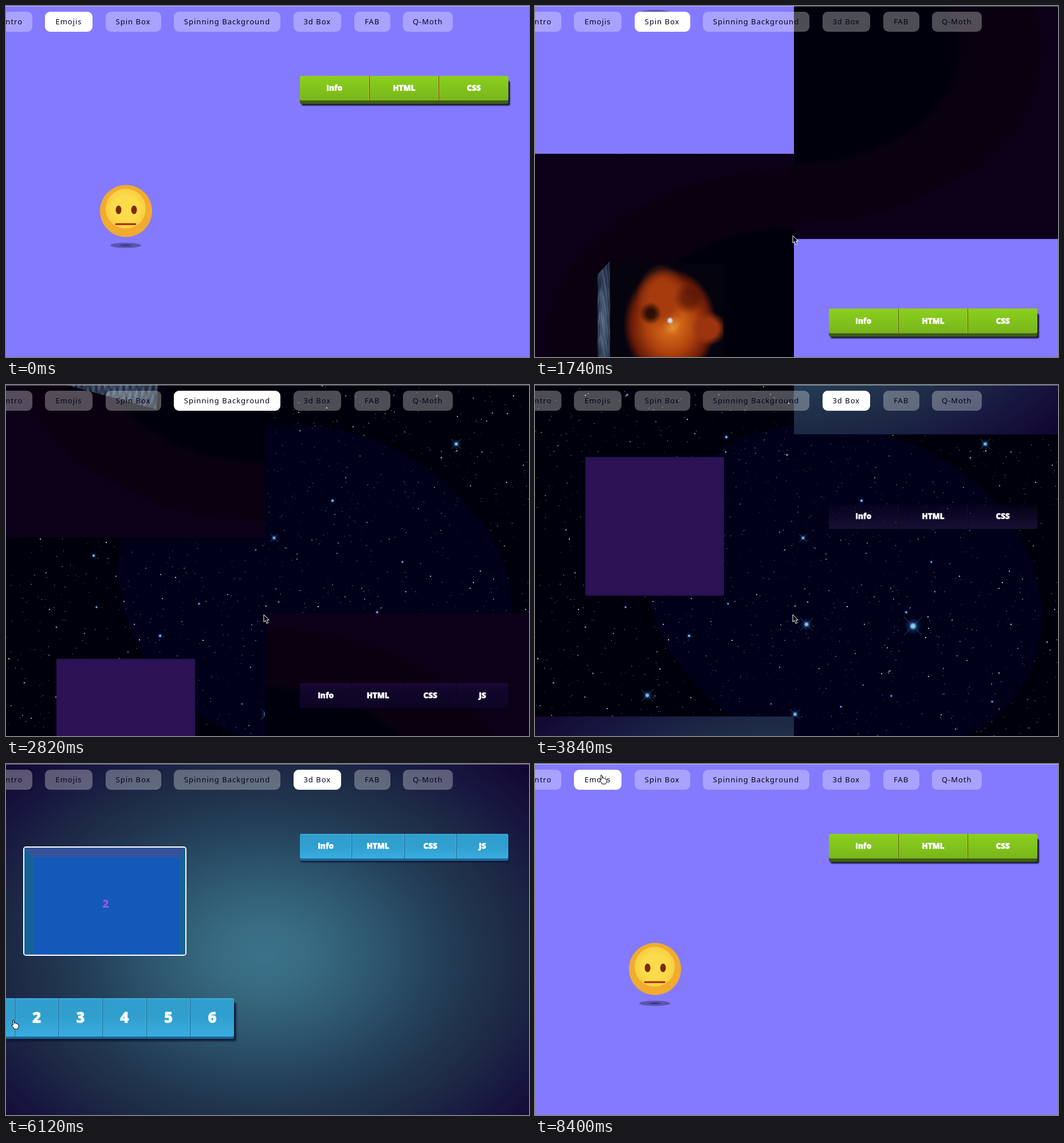
These frames come from a looping animation (913x613 px, 8460 ms). An HTML page with a canvas:

```html
<!DOCTYPE html>
<html lang="en">
<head>
<meta charset="utf-8">
<title>Split scroll showcase</title>
<style>
html, body { margin: 0; width: 100%; height: 100%; overflow: hidden; background: #00000c; }
#stage { position: absolute; left: 0; top: 0; width: 913px; height: 613px; overflow: hidden; }
#stage * { box-sizing: border-box; }
#stars, .half, .panel, .tab, .bar, .view, .room, .wall, .cube, .face, svg, #topline { position: absolute; }
.half { top: 0; height: 613px; overflow: hidden; }
#left { left: 0; width: 452px; }
#right { left: 452px; width: 461px; }
.panel { left: 0; top: 0; width: 913px; height: 665px; }
#right .panel { left: -452px; }
.p0 { background: #847aff; }
.p1 { background: radial-gradient(ellipse 640px 450px at 452px 332px, #00000c 0 44%, #090010 46%, #0a0010 66%, #0c0018 69% 100%); }
.p3 { background: radial-gradient(ellipse 640px 470px at 451px 332px,
  #3b728a 0, #386c82 12%, #2d556d 32%, #25425b 46%, #21354f 57%, #1d2845 70%, #171640 84%, #120630 100%); }
#topline { left: 0; top: 0; width: 913px; height: 1px; background: rgba(255,255,255,.42); }
.tab { top: 10px; height: 35px; border-radius: 9px; background: rgba(255,255,255,.3); color: #05021a;
  font: 13px/34px "Noto Sans", sans-serif; letter-spacing: 1px; text-align: center; white-space: nowrap; }
.tab.on { background: #fff; }
.bar { display: flex; left: 513px; top: 122px; width: 364px; height: 43px; border-radius: 3px; color: #fff;
  font: 800 13.5px/43px "Open Sans", Lato, sans-serif; text-align: center; -webkit-text-stroke: .5px #fff; }
.bar span { flex: 1; }
.bar span + span { border-left: 1px solid var(--line); box-shadow: -1px 0 var(--glint); }
.p0 .bar { background: linear-gradient(#8bd01e, #79b51b); --line: #42650d; --glint: #d9b03c;
  box-shadow: 0 6px #3c5f12, 3px 9px 2px rgba(10,10,25,.85); }
.p1 .bar { background: linear-gradient(#210638 0, #12062c 20%, #0d0525); --line: #06021a; --glint: #180a31; }
.p2 .bar { background: linear-gradient(rgba(22,5,48,.2), rgba(28,18,56,.85)); --line: #050416; --glint: #1d1236; }
.p3 .bar { background: linear-gradient(#45b3e3 0, #309fce 4%, #309fce 48%, #39acdf); --line: #1d6793; --glint: #4db5e0;
  box-shadow: 0 4px #1b6695, 1px 7px 2px rgba(15,20,50,.7); }
.p3 .bar.digits { left: -61px; top: 409px; width: 459px; height: 67px; font-size: 26px; line-height: 67px;
  box-shadow: 0 4px #1b6695, 4px 8px 3px rgba(12,16,45,.8); }
.badge { position: absolute; left: 88px; top: 212px; width: 242px; height: 242px; background: #2a1255; }
.view { left: 30px; top: 144px; width: 285px; height: 191px; border: 2px solid #fff; border-radius: 5px; overflow: hidden;
  background: #166296; perspective: 900px; perspective-origin: 180px 180px; }
.room { left: 16px; top: 16px; width: 256px; height: 171px; transform-style: preserve-3d; }
.wall { left: 0; top: 0; width: 256px; height: 171px; padding: 0 4px 8px 0; backface-visibility: hidden;
  display: flex; align-items: center; justify-content: center; border: 1px solid rgba(60,90,200,.5);
  color: #9657e6; font: 800 19px "Open Sans", Lato, sans-serif; }
.wall.flat { top: -42.5px; height: 256px; }
.wall:first-child { color: #fff; }
.scene { position: absolute; left: 119px; top: 203px; width: 180px; height: 180px; perspective: 700px; }
.cube { width: 180px; height: 180px; transform-style: preserve-3d; }
.face { width: 180px; height: 180px; backface-visibility: hidden; }
.nebula { background:
  radial-gradient(circle at 51% 49%, #c7d8ff 0 2%, transparent 4%),
  radial-gradient(circle at 34% 43%, rgba(15,3,6,.8) 0 4%, transparent 11%),
  radial-gradient(circle at 68% 30%, rgba(70,14,4,.6) 0 6%, transparent 14%),
  radial-gradient(ellipse 22% 20% at 86% 56%, #9c350f 0 40%, transparent 75%),
  radial-gradient(ellipse 25% 32% at 44% 30%, #a63b0d 0 45%, transparent 90%),
  radial-gradient(ellipse 42% 48% at 52% 52%, #f0a63a 0, #d06519 20%, #ae410d 52%, #6a1b08 82%, transparent 98%), #05040e; }
.dust { background:
  repeating-linear-gradient(77deg, transparent 0 5px, rgba(5,8,25,.5) 8px, transparent 13px),
  repeating-linear-gradient(103deg, transparent 0 3px, rgba(140,165,195,.35) 5px, transparent 9px),
  radial-gradient(ellipse at 50% 50%, #62758f, #34465f 55%, #131c30 95%); }
</style>
</head>
<body>
<div id="stage">
  <canvas id="stars" width="913" height="613"></canvas>
  <div id="left" class="half"></div>
  <div id="right" class="half"></div>
  <div id="topline"></div>
  <div id="tabs"></div>
  <svg id="cursor" width="24" height="24" viewBox="0 0 24 24" stroke-linejoin="round">
    <path id="arrow" d="M1 1V14L4 11.300 6.200 16.500 8.700 15.400 6.500 10.400H10.200Z" fill="#05040c" stroke="#fff"/>
    <path id="hand" d="M3 1.500Q4.700.500 5.200 2.500L5.800 7Q8 5.500 9 7.500 11 6.500 11.500 8.800 13.300 8.300 13.300 10.500 13.400 14 11 17H5.500Q3.500 13 1 11 .300 9 3.300 10Z" fill="#fff" stroke="#05040c"/>
  </svg>
</div>
<script>
const STEP = 60, LOOP = 8460, PANEL = 665;
const $ = id => document.getElementById(id);

// Scroll moves: start, duration, panel to reach
const moves = [[1121, 700, 1], [2204, 700, 2], [3420, 700, 3], [7412, 685, 0]];
// Pointer path: time, x, y
const path = [[60, 113, 22], [700, 449, 400], [4600, 449, 400], [5000, 56, 446], [5900, 56, 446],
  [6150, 7, 446], [6900, 7, 446], [7280, 112, 18], [LOOP, 112, 18]];

const clamp = x => Math.min(1, Math.max(0, x));
const smooth = x => { x = clamp(x); return x * x * (3 - 2 * x); };

const bar = (labels, kind = '') =>
  `<div class="bar ${kind}">${labels.map(l => `<span>${l}</span>`).join('')}</div>`;
const panels = contents => contents.map((c, i) => `<div class="panel p${i}">${c}</div>`).join('');

const emoji = `<svg width="452" height="665">
  <defs><radialGradient id="skin"><stop offset=".6" stop-color="#fcdc4b"/><stop offset="1" stop-color="#f8ce40"/></radialGradient>
  <radialGradient id="shade"><stop offset=".2" stop-color="#39367f"/><stop offset=".5" stop-color="#5c55ad"/></radialGradient></defs>
  <circle cx="209.500" cy="358" r="45.500" fill="#f1ab2f"/>
  <circle cx="209" cy="354" r="35" fill="url(#skin)"/>
  <g fill="#7d2a07"><ellipse cx="196.500" cy="356" rx="5" ry="7.500"/><ellipse cx="223.500" cy="356" rx="5" ry="7.500"/></g>
  <path d="M192 381H226" stroke="#a12610" stroke-width="3" stroke-linecap="round"/>
  <ellipse cx="209" cy="418" rx="27" ry="4.500" fill="url(#shade)"/></svg>`;

const face = (kind, turn) => `<div class="face ${kind}" style="transform:${turn} translateZ(90px)"></div>`;
const cube = `<div class="scene"><div class="cube" id="cube">${
  [0, 90, 180, 270].map((a, i) => face(i % 2 ? 'dust' : 'nebula', `rotateY(${a}deg)`)).join('')
}${face('dust', 'rotateX(90deg)')}${face('dust', 'rotateX(-90deg)')}</div></div>`;

const wall = (n, color, turn, flat) =>
  `<div class="wall ${flat ? 'flat' : ''}" style="background:${color};transform:${turn} translateZ(${flat ? -85.5 : -128}px)">${n}</div>`;
const room = `<div class="view"><div class="room" id="room">${
  wall(1, '#166296', 'rotateY(0deg)') + wall(2, '#1359b9', 'rotateY(90deg)') +
  wall(3, '#166296', 'rotateY(180deg)') + wall(4, '#392d9b', 'rotateY(-90deg)') +
  wall(5, '#365297', 'rotateX(-90deg)', true) + wall(6, '#365297', 'rotateX(90deg)', true)
}</div></div>`;

const three = ['Info', 'HTML', 'CSS'], four = [...three, 'JS'];
$('left').innerHTML = panels([emoji, cube, '<div class="badge"></div>', room + bar([1, 2, 3, 4, 5, 6], 'digits')]);
$('right').innerHTML = panels([bar(three), bar(four), bar(three), bar(four)]);

const tabs = [['Intro', -23, 46], ['Emojis', 68, 151], ['Spin Box', 173.5, 270.5], ['Spinning Background', 293, 479],
  ['3d Box', 501.5, 585], ['FAB', 607.5, 671], ['Q-Moth', 693, 779.5]];
$('tabs').innerHTML = tabs.map(([label, x, end]) =>
  `<div class="tab" style="left:${x}px;width:${end - x}px">${label}</div>`).join('');
const tabNodes = [...$('tabs').children];
const leftNodes = [...$('left').children], rightNodes = [...$('right').children];

function paintStars() {
  const g = $('stars').getContext('2d');
  let seed = 7;
  const rand = () => (seed = seed * 16807 % 2147483647) / 2147483647;
  g.fillStyle = '#00000c';
  g.fillRect(0, 0, 913, 613);
  g.fillStyle = '#000019';
  g.beginPath();
  g.ellipse(540, 362, 352, 285, .35, 0, 7);
  g.fill();
  for (let i = 0; i < 1500; i++) {
    const size = rand() < .2 ? 2 : 1;
    g.fillStyle = `rgba(${185 + 60 * rand()},${195 + 45 * rand()},240,${.2 + .75 * rand() ** 2})`;
    g.fillRect(Math.floor(913 * rand()), Math.floor(613 * rand()), size, size);
  }
  const bright = [[786, 103, 9], [660, 421, 16], [474, 418, 11], [196, 542, 10], [454, 575, 9], [468, 267, 7],
    [570, 202, 6], [269, 438, 6], [153, 298, 6], [334, 91, 6], [648, 397, 5], [692, 309, 4], [337, 382, 4],
    [158, 388, 4], [440, 122, 4], [161, 17, 4], [32, 520, 3], [88, 423, 3], [760, 127, 3], [798, 553, 4],
    [622, 543, 4], [894, 449, 3], [476, 379, 3], [534, 562, 4]];
  for (const [x, y, r] of bright) {
    const glow = g.createRadialGradient(x, y, 0, x, y, r);
    glow.addColorStop(0, '#d5ffff');
    glow.addColorStop(.22, '#69bddf');
    glow.addColorStop(.45, 'rgba(45,85,160,.4)');
    glow.addColorStop(1, 'rgba(30,40,120,0)');
    g.fillStyle = glow;
    g.fillRect(x - r, y - r, 2 * r, 2 * r);
    if (r < 7) continue;
    g.strokeStyle = 'rgba(75,140,185,.55)';
    g.beginPath();
    for (const s of [-1, 1]) {
      g.moveTo(x - r, y - r * s);
      g.lineTo(x + r, y + r * s);
    }
    g.stroke();
  }
}

function scrollAt(t) {
  let position = 0, target = 0;
  for (const [start, duration, to] of moves) {
    if (t < start) break;
    position = target + (to - target) * clamp((t - start) / duration) ** 4;
    target = to;
  }
  return { position, target };
}

function pointerAt(t) {
  const i = Math.max(1, path.findIndex(k => k[0] >= t));
  const [t0, x0, y0] = path[i - 1], [t1, x1, y1] = path[i];
  const k = smooth((t - t0) / (t1 - t0));
  return [x0 + (x1 - x0) * k, y0 + (y1 - y0) * k];
}

function render(t) {
  const { position, target } = scrollAt(t);
  leftNodes.forEach((n, i) => n.style.transform = `translateY(${(i - position) * PANEL}px)`);
  rightNodes.forEach((n, i) => n.style.transform = `translateY(${(position - i) * PANEL}px)`);
  tabNodes.forEach((n, i) => n.classList.toggle('on', i === target + 1));

  const spin = t - 1740;
  $('cube').style.transform = `rotateX(${-.028 * spin}deg) rotateY(${14 + .05 * spin}deg)`;
  const turn = smooth((t - 5040) / 700) - smooth((t - 6240) / 700);
  $('room').style.transform = `translateZ(128px) rotateY(${-90 * turn}deg)`;

  const [x, y] = pointerAt(t);
  const overDigits = target === 3 && x < 398 && y > 409;
  const hand = y < 45 || overDigits;
  $('cursor').style.display = t < 60 ? 'none' : 'block';
  $('cursor').style.transform = `translate(${x}px,${y}px)`;
  $('hand').style.display = hand ? 'inline' : 'none';
  $('arrow').style.display = hand ? 'none' : 'inline';
}

paintStars();
const began = performance.now();
function tick() {
  const t = (performance.now() - began) % LOOP;
  render(Math.floor(t / STEP) * STEP);
  requestAnimationFrame(tick);
}
tick();
</script>
</body>
</html>
```
